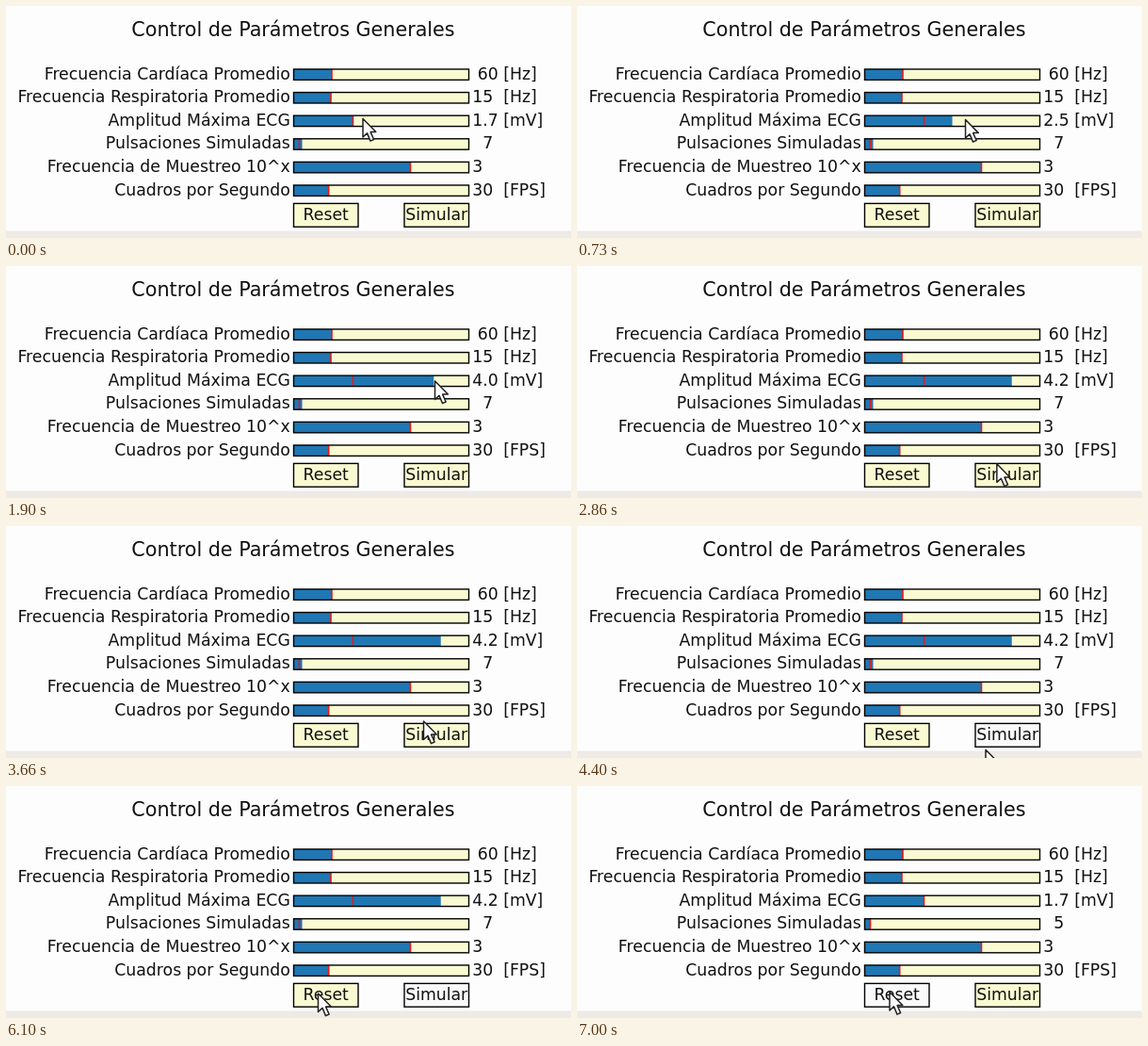
An HTML page for the animation above (7030 ms loop, 600 px wide and 246 px high).

```html
<!DOCTYPE html>
<html lang="es">
<head>
<meta charset="utf-8">
<title>Control de Parámetros Generales</title>
<style>
  html, body { margin: 0; width: 100%; height: 100%; overflow: hidden; background: #fdfdfd; }
  svg { display: block; width: 600px; height: 246px; }
  text { font: 17.3px "DejaVu Sans", sans-serif; white-space: pre; fill: #111; }
  .title { font-size: 20.7px; }
  .middle { text-anchor: middle; }
  .end { text-anchor: end; }
</style>
</head>
<body>
<svg id="stage" viewBox="0 0 600 246"></svg>
<script>
const LOOP = 7030;
const LEFT = 305.5, WIDTH = 186, AMP_MAX = 5;
const CREAM = '#fafad2', HOVER = '#f9f9f9', BLUE = '#1f77b4', RED = '#e8191c';
const stage = document.getElementById('stage');

function add(tag, attrs, content = '') {
  const node = document.createElementNS('http://www.w3.org/2000/svg', tag);
  for (const key in attrs) node.setAttribute(key, attrs[key]);
  node.textContent = content;
  stage.appendChild(node);
  return node;
}

function addSlider(row, label, value, fillEnd, initial = fillEnd) {
  const y = 72.6 + row * 24.6, top = y - 5.6, height = 11.4;
  add('text', { x: 301.8, y: y + 5, class: 'end' }, label);
  add('rect', { x: LEFT, y: top, width: WIDTH, height, fill: CREAM });
  const bar = add('rect', { x: LEFT, y: top, width: fillEnd - LEFT, height, fill: BLUE });
  add('rect', { x: initial - 0.8, y: top, width: 1.6, height, fill: RED });
  add('rect', { x: LEFT, y: top, width: WIDTH, height, fill: 'none', stroke: '#000', 'stroke-width': 1.4 });
  const text = add('text', { x: 495.2, y: y + 5 }, value);
  return {
    set(end, str) {
      bar.setAttribute('width', end - LEFT);
      if (text.textContent !== str) text.textContent = str;
    }
  };
}

function addButton(x, label) {
  const box = add('rect', { x, y: 209.4, width: 68.5, height: 24.8, fill: CREAM, stroke: '#000', 'stroke-width': 1.4 });
  add('text', { x: x + 34.2, y: 226.6, class: 'middle' }, label);
  return box;
}

add('rect', { width: 600, height: 246, fill: '#fdfdfd' });
add('rect', { y: 238.5, width: 600, height: 8, fill: '#eeeae6' });
add('text', { x: 305, y: 32, class: 'title middle' }, 'Control de Parámetros Generales');

addSlider(0, 'Frecuencia Cardíaca Promedio', ' 60 [Hz]', 346);
addSlider(1, 'Frecuencia Respiratoria Promedio', '15  [Hz]', 345);
const amplitude = addSlider(2, 'Amplitud Máxima ECG', '1.7 [mV]', 368.5);
const pulses = addSlider(3, 'Pulsaciones Simuladas', '  7', 314.5, 311.5);
addSlider(4, 'Frecuencia de Muestreo 10^x', '3', 429.5);
addSlider(5, 'Cuadros por Segundo', '30  [FPS]', 342.7);
const reset = addButton(305.5, 'Reset');
const simulate = addButton(423, 'Simular');
const cursor = add('path', {
  d: 'M0 0V19.5L4.5 15.4L8 23.6L11.6 22L8.1 14.1H13.8Z',
  fill: '#fff', stroke: '#222', 'stroke-width': 1.5, 'stroke-linejoin': 'round'
});

// Keyframes: [time, ...values]
const cursorPath = [
  [0, 379, 119.5], [150, 382, 119.5], [730, 412.5, 120.5], [1900, 455.5, 122], [2150, 463, 122],
  [2400, 463, 123], [2850, 446, 210], [3050, 443.5, 207], [4050, 443.5, 207], [4550, 430, 250],
  [5300, 292, 250], [5800, 331.5, 220], [6250, 331.5, 220], [6450, 332, 218.5], [LOOP, 332, 218.5]
];
const amplitudePath = [
  [0, 1.7], [200, 1.7], [230, 2], [730, 2.5], [1900, 4], [2250, 4.2], [LOOP, 4.2]
];
const SIMULATE_HOVER = 3900, RESET_HOVER = 6250, RESET_CLICK = 6400;

function sample(keys, t) {
  const i = Math.max(1, keys.findIndex(key => key[0] >= t));
  const from = keys[i - 1], to = keys[i];
  const k = (t - from[0]) / (to[0] - from[0]);
  return from.slice(1).map((v, n) => v + (to[n + 1] - v) * k);
}

function render(t) {
  const [x, y] = sample(cursorPath, t);
  cursor.setAttribute('transform', `translate(${x} ${y})`);

  const wasReset = t >= RESET_CLICK;
  const amp = wasReset ? 1.7 : sample(amplitudePath, t)[0];
  amplitude.set(LEFT + WIDTH * amp / AMP_MAX, amp.toFixed(1) + ' [mV]');
  pulses.set(wasReset ? 311.5 : 314.5, wasReset ? '  5' : '  7');

  simulate.setAttribute('fill', t >= SIMULATE_HOVER && t < RESET_HOVER ? HOVER : CREAM);
  reset.setAttribute('fill', t >= RESET_HOVER ? HOVER : CREAM);
}

const start = performance.now();
function tick() {
  render((performance.now() - start) % LOOP);
  requestAnimationFrame(tick);
}
tick();
</script>
</body>
</html>
```
